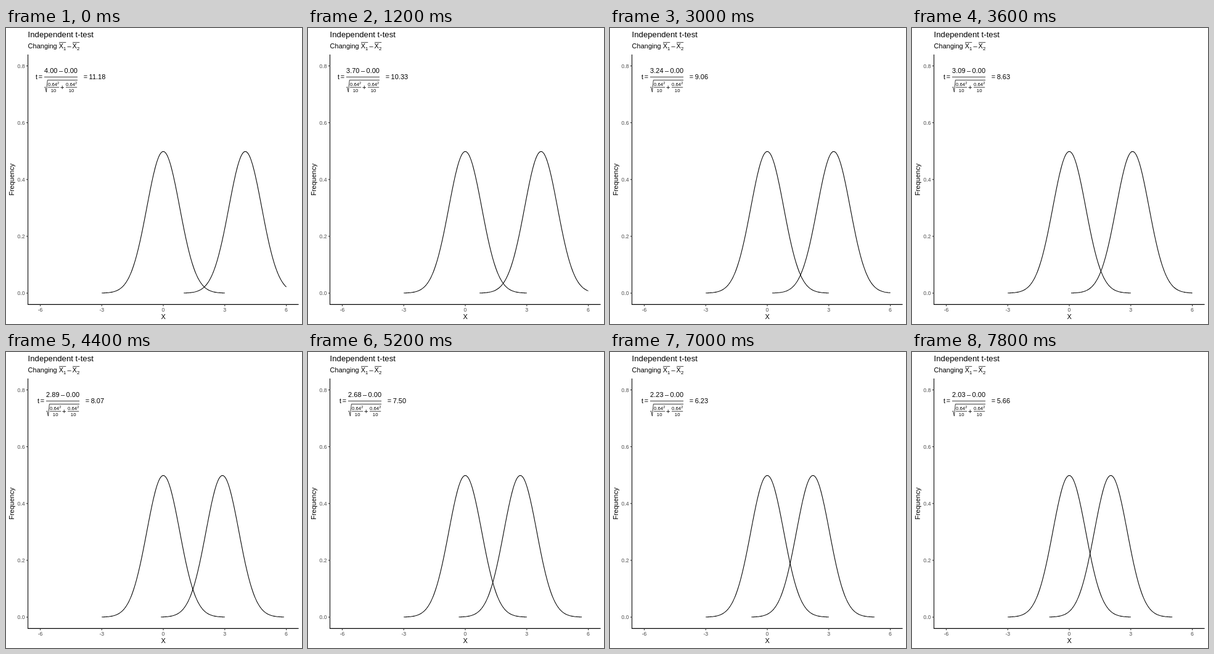
An HTML page for the animation above (8 s loop, 480 px wide and 480 px high).

```html
<!DOCTYPE html>
<html lang="en">
<head>
<meta charset="utf-8">
<title>Independent t-test</title>
<style>
  html, body { margin: 0; width: 100%; height: 100%; overflow: hidden; background: #fff; }
  svg { display: block; width: 100vw; height: 100vh; }
  text { font-family: "Liberation Sans", Arial, sans-serif; font-size: 11px; }
  .title { font-size: 13.2px; }
  .tick { font-size: 8.8px; fill: #4d4d4d; }
  .mid { text-anchor: middle; }
  .end { text-anchor: end; }
  .script { font-size: 7.73px; }
  .sup { font-size: 5.52px; }
  #formula text:not([class]) { font-size: 11.04px; }
  path { fill: none; stroke: #000; stroke-width: 1.07; }
  .ticks { stroke: #333; }
  .rule { stroke-width: .75; }
</style>
</head>
<body>
<svg viewBox="0 0 480 480">
  <text class="title" x="35.6" y="15">Independent t-test</text>
  <text x="35.6" y="33.3">Changing</text>
  <text x="85.7" y="33.3">X</text><text class="script" x="93" y="35.5">1</text>
  <text x="99.5" y="33.3">–</text>
  <text x="107.6" y="33.3">X</text><text class="script" x="114.9" y="35.5">2</text>
  <path class="rule" d="M86 23.4H97.3M108 23.4H119.2"/>

  <g id="axes">
    <path d="M35.6 43.1V448.4H474.5"/>
    <text class="mid" x="255.05" y="472.4">X</text>
    <text class="mid" transform="translate(13.4 245.8) rotate(-90)">Frequency</text>
  </g>

  <path id="still"/>
  <path id="moving"/>

  <g id="formula">
    <text x="48" y="83">t</text>
    <text x="52.7" y="83">=</text>
    <text id="mean" x="62" y="73"></text>
    <text x="85.9" y="73">–</text>
    <text x="94.5" y="73">0.00</text>
    <path class="rule" d="M62 79.5H116"/>
    <path class="rule" d="M62.3 96.5L63.6 95.6L65.4 104L67.3 84.5H116"/>
    <text x="88" y="100">+</text>
    <text x="125.8" y="83">=</text>
    <text id="score" x="134.6" y="83"></text>
  </g>
</svg>
<script>
const STEP = 200, LOOP = 8000, SPAN = 79;
const SD = 0.8, STANDARD_ERROR = Math.sqrt(0.128);
const $ = id => document.getElementById(id);
const px = x => 255.05 + 33.25 * x;
const py = y => 430 - 460.7 * y;
const density = z => Math.exp(-z * z / 2) / (SD * Math.sqrt(2 * Math.PI));

function add(parent, tag, attrs, content = "") {
  const node = document.createElementNS("http://www.w3.org/2000/svg", tag);
  for (const key in attrs) node.setAttribute(key, attrs[key]);
  node.textContent = content;
  parent.append(node);
}

function curve(mean) {
  const from = mean - 3, to = Math.min(mean + 3, 6), n = 150;
  const points = Array.from({ length: n + 1 }, (_, i) => {
    const x = from + (to - from) * i / n;
    return px(x).toFixed(2) + " " + py(density((x - mean) / SD)).toFixed(2);
  });
  return "M" + points.join("L");
}

for (const x of [-6, -3, 3, 0, 6]) {
  add($("axes"), "path", { class: "ticks", d: `M${px(x)} 448.4v2.75` });
  add($("axes"), "text", { class: "tick mid", x: px(x), y: 459.8 }, x);
}
for (const y of [0, 0.2, 0.4, 0.6, 0.8]) {
  add($("axes"), "path", { class: "ticks", d: `M35.6 ${py(y)}h-2.75` });
  add($("axes"), "text", { class: "tick end", x: 30.65, y: py(y) + 3.15 }, y.toFixed(1));
}
for (const x of [68, 97]) {
  add($("formula"), "text", { class: "script", x, y: 94.3 }, "0.64");
  add($("formula"), "text", { class: "sup", x: x + 15.1, y: 91 }, "2");
  add($("formula"), "path", { class: "rule", d: `M${x} 96.2h18.2` });
  add($("formula"), "text", { class: "script mid", x: x + 9.1, y: 103.8 }, "10");
}
$("still").setAttribute("d", curve(0));

let shown = -1;
function draw(now) {
  const step = Math.floor(now % LOOP / STEP);
  if (step !== shown) {
    shown = step;
    const mean = 4 - 4 * step / SPAN, t = mean / STANDARD_ERROR;
    $("moving").setAttribute("d", curve(mean));
    $("mean").textContent = mean.toFixed(2);
    $("score").textContent = t.toFixed(2);
    // The centred formula narrows by one digit below ten.
    $("formula").setAttribute("transform", `translate(${t < 9.995 ? 3.07 : 0} 0)`);
  }
}

const start = performance.now();
function tick() {
  draw(performance.now() - start);
  requestAnimationFrame(tick);
}
tick();
</script>
</body>
</html>
```
